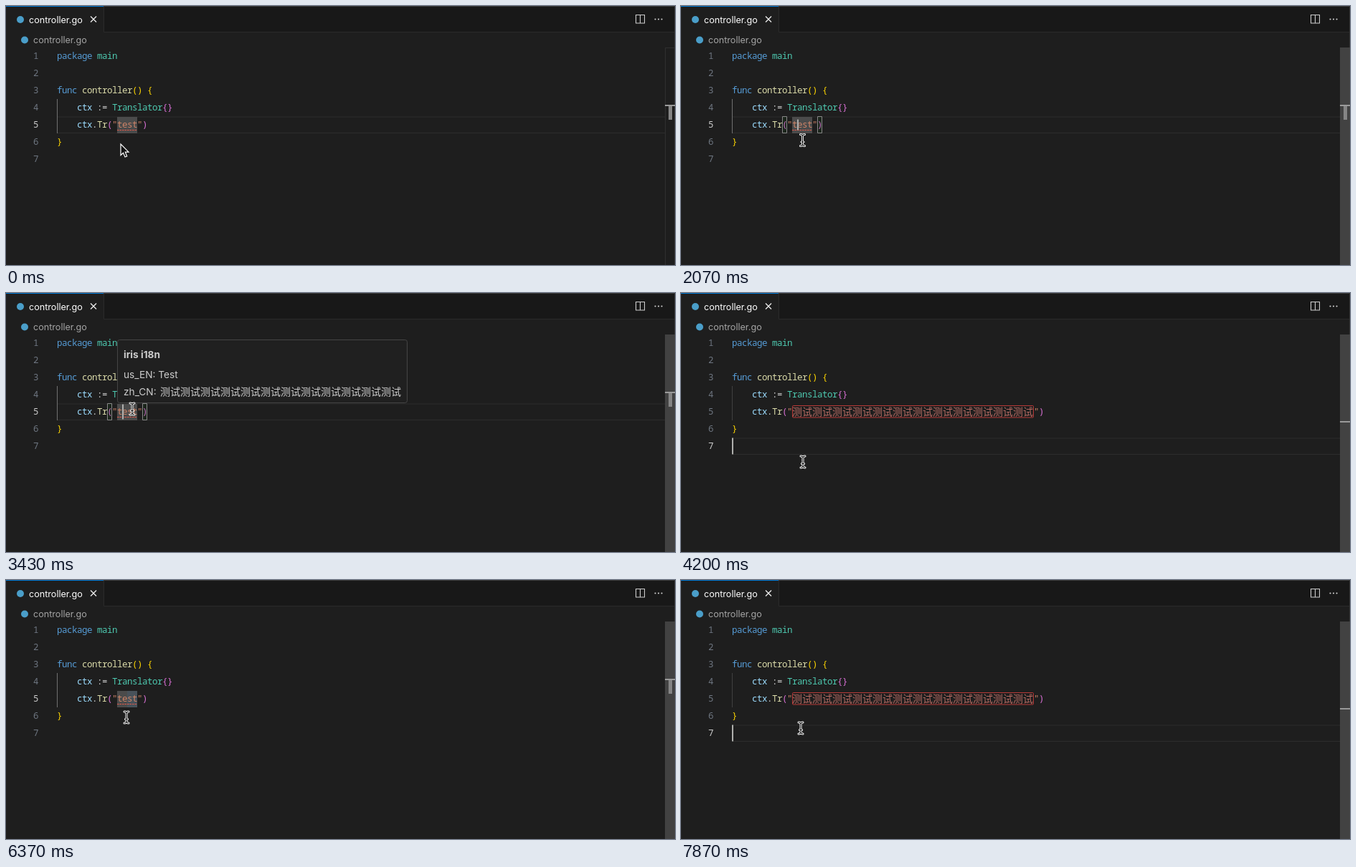
Write an HTML page that moves like this. It is 933 px wide and 362 px high and loops after 8000 ms.

```html
<!DOCTYPE html>
<html lang="en">
<head>
<meta charset="utf-8">
<style>
  html, body { margin: 0; width: 100%; height: 100%; overflow: hidden; background: #1e1e1e; }
  svg { display: block; width: 933px; height: 362px; }
  text { white-space: pre; }
  .ui { font: 12.6px Inter, sans-serif; fill: #a5a5a5; }
  .code { font: 12.5px "Noto Sans Mono", monospace; letter-spacing: -.5px; }
  .cjk { font: 14px "Noto Sans CJK SC", "Noto Sans CJK", sans-serif; }
  .tip { font-size: 13.7px; fill: #ccc; }
  .keyword { fill: #569cd6; }
  .type { fill: #4ec9b0; }
  .func { fill: #dcdcaa; }
  .var { fill: #9cdcfe; }
  .plain { fill: #d4d4d4; }
  .gold { fill: #ffd700; }
  .pink { fill: #da70d6; }
  .string { fill: #ce8468; }
  .number { fill: #6e7681; }
  .number.active { fill: #ccc; }
</style>
</head>
<body>
<svg viewBox="0 0 933 362">
  <rect width="933" height="362" fill="#1e1e1e"/>
  <rect width="933" height="36" fill="#181818"/>
  <rect width="136" height="37" fill="#1e1e1e"/>
  <path d="M136.5 1V36.5H933" fill="none" stroke="#2b2b2b"/>
  <path d="M136 .5H933" stroke="#3c3c3c"/>
  <path d="M0 .5H136" stroke="#0078d4"/>
  <circle cx="20" cy="19" r="5" fill="#4a9ec9"/>
  <circle cx="26" cy="47.5" r="5" fill="#4a9ec9"/>
  <text class="ui" x="32" y="23.5" style="fill:#fff">controller.go</text>
  <text class="ui" x="38" y="52">controller.go</text>
  <path d="M118 14.5l8 8m0-8l-8 8" stroke="#eee" stroke-width="1.3"/>
  <path d="M878.5 12.5h12v11.5h-12zM884.5 12.5v11.5" fill="none" stroke="#ccc" stroke-width="1.1"/>
  <path d="M905.5 18.5h.01m4.5 0h.01m4.5 0h.01" stroke="#ccc" stroke-width="2.2" stroke-linecap="round"/>

  <path id="lineBox" d="M72 1H919M72 23.5H919" stroke="#2d2d2d"/>
  <path id="guide" d="M71.5 130V178"/>
  <g id="wordBox">
    <rect x="155" y="155" width="28" height="23" fill="#4b4b4b"/>
    <rect id="selection" x="169" y="155" width="14" height="23" fill="#48525a"/>
  </g>
  <g id="code" class="code"></g>
  <g id="word">
    <text class="code string" x="155" y="169.7">test</text>
    <path d="M155 173.5h28" stroke="#e0584a" stroke-dasharray="2.5 1"/>
  </g>
  <g id="translation">
    <text class="cjk" x="155" y="170.7" fill="#b56a62"></text>
    <rect x="155.5" y="157.5" width="336" height="16.5" rx="1" fill="none" stroke="#b83a38"/>
  </g>
  <text id="tail" class="code" y="169.7"><tspan class="string">"</tspan><tspan class="pink">)</tspan></text>
  <path id="brackets" d="M141.5 154.5h6v23h-6zM190.5 154.5h6v23h-6z" fill="#0064001a" stroke="#888"/>

  <path d="M919.5 362V58.5H933" fill="none" stroke="#303030"/>
  <path d="M932.5 0V362" stroke="#303030"/>
  <rect id="slider" x="919" y="58" width="14" height="304" fill="#424242"/>
  <rect id="wordMark" x="924" y="139" width="5" height="20" fill="#858585"/>
  <rect id="lineMark" x="919" width="14" height="2" fill="#9a9a9a"/>

  <rect id="caret" width="2" fill="#aeafad"/>
  <g id="tooltip">
    <rect x="155.5" y="65.5" width="404" height="88" rx="3" fill="#202020" stroke="#454545"/>
    <text class="ui tip" x="164" y="91" style="font-weight:700">iris i18n</text>
    <text class="ui tip" x="164" y="118.5">us_EN: Test</text>
    <text class="ui tip" x="164" y="142.5">zh_CN:</text>
    <text class="cjk" x="215" y="143" fill="#ccc"></text>
  </g>

  <path id="arrow" d="M0 0V15.5L3.5 12.2L6 18L8.7 16.9L6.3 11.2H11Z" fill="#111" stroke="#fff" stroke-width="1.2"/>
  <g id="beam" fill="none" stroke-linecap="round">
    <path id="beamShape" d="M-3-8Q0-8 0-5.5Q0-8 3-8M0-5.5V5.5M-3 8Q0 8 0 5.5Q0 8 3 8M-1.5 2.5H1.5" stroke="#fff" stroke-width="3"/>
    <path d="M-3-8Q0-8 0-5.5Q0-8 3-8M0-5.5V5.5M-3 8Q0 8 0 5.5Q0 8 3 8M-1.5 2.5H1.5" stroke="#111" stroke-width="1.1"/>
  </g>
</svg>
<script>
const LOOP = 8000, CHAR = 7, LEFT = 71, ROW = 24;
const $ = id => document.getElementById(id);
const show = (id, visible) => $(id).setAttribute('opacity', +visible);
const move = (id, x, y) => $(id).setAttribute('transform', `translate(${x} ${y})`);
const clamp = v => Math.min(1, Math.max(0, v));
const smooth = v => v * v * (3 - 2 * v);
const rowTop = row => 58 + (row - 1) * ROW;

// Each token: column, class, text
const lines = [
  [[0, 'keyword', 'package'], [8, 'type', 'main']],
  [],
  [[0, 'keyword', 'func'], [5, 'func', 'controller'], [15, 'gold', '()'], [18, 'gold', '{']],
  [[4, 'var', 'ctx'], [8, 'plain', ':='], [11, 'type', 'Translator'], [21, 'pink', '{}']],
  [[4, 'var', 'ctx'], [7, 'plain', '.'], [8, 'func', 'Tr'], [10, 'pink', '('], [11, 'string', '"']],
  [[0, 'gold', '}']],
  []
];
$('code').innerHTML = lines.map((tokens, i) => {
  const y = rowTop(i + 1) + 15.7;
  return `<text id="n${i + 1}" class="number" x="38" y="${y}">${i + 1}</text>` +
    tokens.map(([col, type, text]) =>
      `<text class="${type}" x="${LEFT + col * CHAR}" y="${y}">${text}</text>`).join('');
}).join('');
document.querySelectorAll('.cjk').forEach(el => el.textContent = '测试'.repeat(12));

// Editor states by start time
const states = [
  { at: 0, row: 5 },
  { at: 780, row: 5, col: 13, brackets: true },
  { at: 4070, row: 7, col: 0 },
  { at: 5380, row: 5, col: 14, brackets: true },
  { at: 5490, row: 5, col: 16, selected: true },
  { at: 7500, row: 7, col: 0 }
];
const tooltips = [[2900, 4000], [6900, 7350]];

// Pointer stops: time, x, y
const pointer = [
  [0, 160, 193], [30, 160, 193], [400, 164, 184], [630, 164, 184], [780, 164, 170],
  [1070, 164, 169], [1430, 166, 175], [2070, 169.5, 187.5], [2250, 170, 199], [2350, 170, 199],
  [2600, 175, 164], [3430, 176, 162], [3930, 174, 181], [4070, 172, 220], [4200, 170, 236],
  [4430, 168, 229], [4700, 168, 229], [5050, 166, 166], [5270, 166, 165], [5380, 168, 165],
  [5490, 181, 166], [5800, 178, 172], [6370, 168, 192], [6450, 168, 199], [6700, 170, 165],
  [7170, 171, 164], [7500, 168, 212], [7870, 167, 207], [LOOP, 167, 207]
];

function pointerAt(t) {
  const i = pointer.findIndex(p => p[0] > t);
  const [t0, x0, y0] = pointer[i - 1], [t1, x1, y1] = pointer[i];
  const k = smooth((t - t0) / (t1 - t0));
  return [x0 + (x1 - x0) * k, y0 + (y1 - y0) * k];
}

// Solid for half a second after a move, then shrinks and grows once per second
function caretScale(age) {
  if (age < 500) return 1;
  const phase = (age - 500) % 1000;
  return 1 - smooth(clamp((Math.min(phase, 1000 - phase) - 100) / 270));
}

function draw(t) {
  const state = states.findLast(s => s.at <= t);
  const { row, col } = state, onWord = row === 5;

  lines.forEach((_, i) => $('n' + (i + 1)).classList.toggle('active', i + 1 === row));
  move('lineBox', 0, rowTop(row));
  show('lineBox', !state.selected);
  $('guide').setAttribute('stroke', onWord ? '#707070' : '#404040');
  for (const id of ['wordBox', 'word', 'wordMark']) show(id, onWord);
  show('translation', !onWord);
  show('selection', !!state.selected);
  show('brackets', !!state.brackets);
  $('tail').setAttribute('x', onWord ? 183 : 492);
  $('lineMark').setAttribute('y', onWord ? 138 : 179);
  show('slider', clamp((t - 60) / 100));

  const height = 23 * caretScale(t - state.at);
  show('caret', col !== undefined);
  $('caret').setAttribute('x', LEFT + (col || 0) * CHAR);
  $('caret').setAttribute('y', rowTop(row) + 12 - height / 2);
  $('caret').setAttribute('height', height);

  const tip = tooltips.find(([from, to]) => t >= from && t < to);
  show('tooltip', tip ? clamp((t - tip[0]) / 100) : 0);

  const [x, y] = pointerAt(t);
  show('arrow', t < 60);
  show('beam', t >= 60);
  move('arrow', x, y);
  move('beam', x, y);
}

const start = performance.now();
function frame() {
  draw((performance.now() - start) % LOOP);
  requestAnimationFrame(frame);
}
frame();
</script>
</body>
</html>
```
